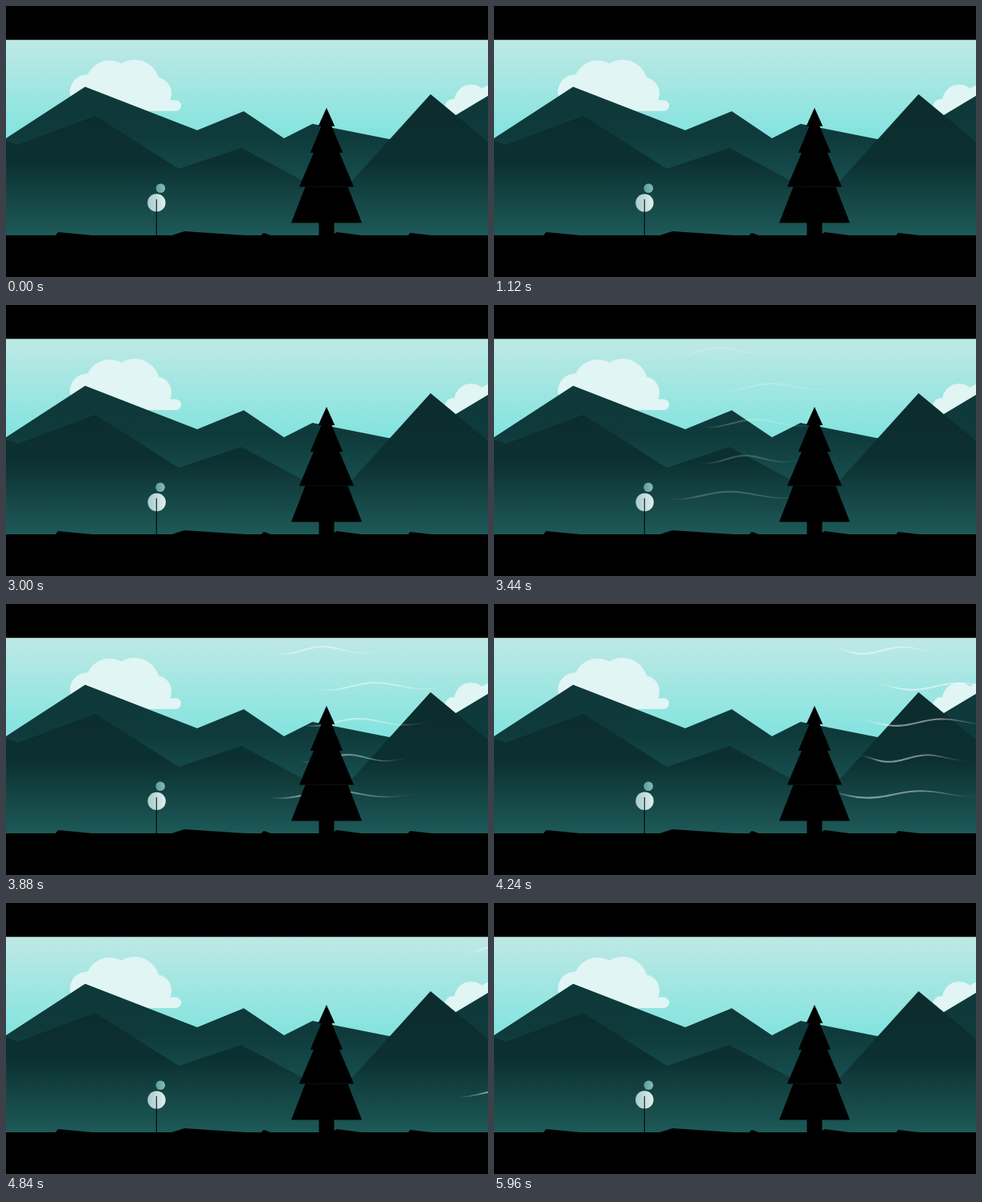
An HTML page with a canvas that plays this animation: 600 by 338 pixels, repeating every 6 s.

```html
<!DOCTYPE html>
<html lang="en">
<head>
<meta charset="utf-8">
<title>Windy valley</title>
<style>
html, body { margin: 0; width: 100%; height: 100%; overflow: hidden; background: #000; }
canvas { display: block; }
</style>
</head>
<body>
<canvas id="stage" width="600" height="338"></canvas>
<script>
const ctx = document.getElementById('stage').getContext('2d');
const { PI, sin, cos, min, max } = Math;
const LOOP = 6000, SPEED = 0.2475, BAR = 338 / 8;

function gradient(x0, y0, x1, y1, stops) {
  const g = ctx.createLinearGradient(x0, y0, x1, y1);
  for (const [at, color] of stops) g.addColorStop(at, color);
  return g;
}

// Points as "x,y x,y ..."
function poly(points, fill) {
  ctx.beginPath();
  for (const p of points.split(' ')) ctx.lineTo(...p.split(',').map(Number));
  ctx.fillStyle = fill;
  ctx.fill();
}

function disc(x, y, r, fill) {
  ctx.beginPath();
  ctx.arc(x, y, r, 0, 2 * PI);
  ctx.fillStyle = fill;
  ctx.fill();
}

function cloud(...puffs) {
  for (const [x, y, r] of puffs) disc(x, y, r, '#e0f5f4');
}

const sky = gradient(0, 42, 0, 165, [[0, '#bfe9e5'], [1, '#82e3df']]);
const farHills = gradient(0, 100, 0, 240, [[0, '#0e3839'], [.45, '#0f3a3b'], [1, '#1a5756']]);
const nearHills = gradient(0, 109, 0, 286, [[0, '#0c2b2c'], [.48, '#0c3031'], [1, '#1d5a58']]);

function landscape() {
  ctx.fillStyle = sky;
  ctx.fillRect(0, 0, 600, 286);
  cloud([101, 107, 21.5], [129, 98, 30], [160, 98.5, 31.5], [186, 109, 20]);
  ctx.beginPath();
  ctx.roundRect(100, 117.6, 118, 13.4, 6.7);
  ctx.fill();
  cloud([557, 127, 11], [579, 119, 21], [606, 118, 20], [580, 130, 16]);
  poly('0,165 98.5,100.8 238,155 296,131.3 346,165 381.5,147 477,166 520,160 600,112 600,286 0,286', farHills);
  poly('0,168 15,173 111,137 215,203 293,177 411,240 528.5,110 600,169.5 600,286 0,286', nearHills);
}

// Left end at 3440 ms and length of each gust, top to bottom
const gusts = [[222, 143], [275, 172], [257, 165], [256, 137], [215, 190]];

function wind(t) {
  const alpha = max(0, min(.5, (t - 3080) / 1800));
  if (!alpha || t > 5300) return;
  // The wave slides back and forth along its line
  const trough = .14 + .14 * cos(2 * PI * (t - 4240) / 1200);
  ctx.globalAlpha = alpha;
  gusts.forEach(([start, length], row) => {
    const x = start + SPEED * (t - 3440), y = 57.5 + 44.9 * row;
    const edge = (s, side) => {
      const wave = (5.2 - 2.2 * s) * cos(2 * PI * (s - trough) / .7);
      ctx.lineTo(x + s * length, y + wave + side * (.25 + .85 * sin(PI * s ** .7)));
    };
    ctx.beginPath();
    for (let i = 0; i <= 48; i++) edge(i / 48, -1);
    for (let i = 48; i >= 0; i--) edge(i / 48, 1);
    ctx.fillStyle = gradient(x, 0, x + length, 0,
      [[0, '#fff0'], [.2, '#fff'], [.6, '#fffd'], [1, '#fff0']]);
    ctx.fill();
  });
  ctx.globalAlpha = 1;
}

function flower(t) {
  const sway = cos(2 * PI * t / LOOP);
  const x = 187.5 - .15 * sway, y = 245.7 - .3 * sway;
  disc(192.2 + .2 * sway, 227.3, 5.8, gradient(186, 0, 198, 0, [[0, '#5b9b99'], [1, '#86bcb9']]));
  disc(x, y, 11.2, gradient(x - 11, y, x + 11, y, [[0, '#a6cccb'], [1, '#deeeed']]));
  ctx.fillStyle = '#000';
  ctx.fillRect(186.8, 241, 1, 46);
}

// Tiers from the top: half width above, half width below, bottom
function tree(x) {
  let top = 127;
  for (const [neck, skirt, bottom] of [[0, 10.3, 150], [6.5, 20.2, 183], [16, 34, 225.5], [26.5, 44, 270.5]]) {
    poly(`${x - neck},${top} ${x + neck},${top} ${x + skirt},${bottom} ${x - skirt},${bottom}`, '#000');
    top = bottom;
  }
  ctx.fillRect(x - 9.5, 270, 19, 17);
}

function foreground() {
  tree(399);
  poly('0,286.4 61,286.4 65,282 112,286.4 205,286.4 222,281 305,286.4 317,286.4 321,283 331,286.4 ' +
    '404,286.4 412,282 446,286.4 500,286.4 503,283 534,286.4 600,286.4 600,338 0,338', '#000');
  ctx.fillRect(0, 0, 600, BAR);
}

function draw(now) {
  const t = now % LOOP;
  landscape();
  wind(t);
  flower(t);
  foreground();
  requestAnimationFrame(draw);
}
requestAnimationFrame(draw);
</script>
</body>
</html>
```
